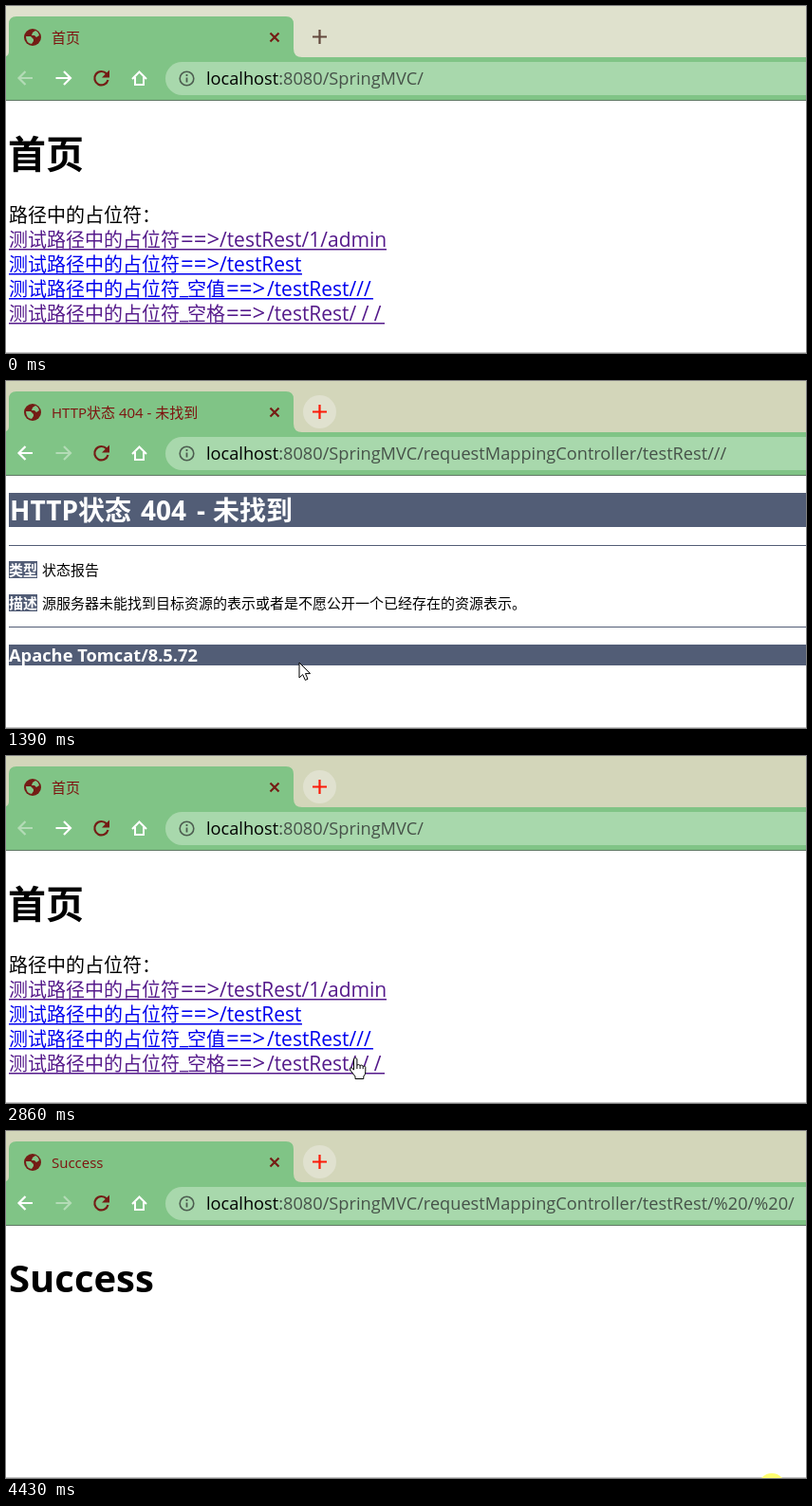
Write an HTML page that moves like this. It is 843 by 366 pixels and loops after 4500 ms.

```html
<!DOCTYPE html>
<html lang="zh-CN">
<head>
<meta charset="utf-8">
<title>首页</title>
<style>
  html, body { margin: 0; width: 100%; height: 100%; overflow: hidden; background: #fff; }
  svg { display: block; width: 843px; height: 366px; }
  text { font: 15px "Open Sans", "Noto Sans CJK SC", "Noto Sans CJK", sans-serif; white-space: pre; }
  .red { fill: #7d120f; }
  .line { fill: none; stroke-width: 2.2; }
  .url { font-size: 18.2px; fill: #465249; }
  .bold { font-weight: 700; }
  .white { fill: #fff; }
  .slate { fill: #525d76; }
</style>
</head>
<body>
<svg viewBox="0 0 843 366">
  <defs>
    <linearGradient id="fade">
      <stop stop-color="#80c486" stop-opacity="0"/>
      <stop offset="1" stop-color="#80c486"/>
    </linearGradient>
  </defs>

  <rect id="strip" width="843" height="54"/>
  <path fill="#80c486" d="M0 53q3-1 3-5V19q0-8 8-8H295q8 0 8 8V45q0 9 9 9H843V99H0Z"/>
  <rect y="99" width="843" height="1" fill="#5f7864"/>
  <rect x="168" y="59" width="700" height="35" rx="17.5" fill="#a8d8ac"/>

  <g id="globe">
    <circle cx="28" cy="33" r="9" fill="#741c15"/>
    <path fill="#80c486" d="M21 32h5l3 3v2l-2 3q-6-1-6-8ZM28 28l3-2q3 1 4 5l-3 2l-2-2h-3Z"/>
  </g>
  <path id="spinner" class="line" stroke="#4673a8"/>
  <text id="title" class="red" x="48" y="38.500"></text>
  <rect id="veil" x="238" y="20" width="32" height="28" fill="url(#fade)"/>
  <path class="line" stroke="#741c15" d="M278.500 28.500l9 9m0-9l-9 9"/>
  <circle id="plusDisc" cx="330.500" cy="32.500" r="17.500" fill="#e0e1cf"/>
  <path id="plus" class="line" d="M323 32.500h15M330.500 25v15"/>

  <circle id="hover" cx="20.500" cy="76" r="17.500" fill="#69a771"/>
  <path id="back" class="line" stroke="#fff" d="M28 76H13.500M20.500 69l-7 7l7 7"/>
  <path id="forward" class="line" stroke="#fff" d="M52.500 76H68M61 69l7 7l-7 7"/>
  <g id="reload">
    <path class="line" stroke="#741c15" d="M106 71.500A7.200 7.200 0 1 0 107.500 78"/>
    <path fill="#741c15" d="M109 67.500v8h-8Z"/>
  </g>
  <path id="stop" class="line" stroke="#741c15" d="M93.500 69l14 14m0-14l-14 14"/>
  <path class="line" stroke="#fff" style="stroke-width:2" d="M133 77l7.500-7.500l7.500 7.500M136 75v8h9v-8"/>
  <circle class="line" cx="190.500" cy="76.500" r="7.300" stroke="#4d5d50" style="stroke-width:1.600"/>
  <path class="line" stroke="#4d5d50" style="stroke-width:1.800" d="M190.500 75.500v5M190.500 72v2"/>
  <text class="url" x="211" y="83"><tspan fill="#000">localhost</tspan>:8080/SpringMVC/<tspan id="path"></tspan></text>

  <g id="home">
    <text x="2" y="171" class="bold" style="font-size:40px">首页</text>
    <text x="3" y="228" style="font-size:20px">路径中的占位符：</text>
  </g>

  <g id="error">
    <path class="slate" d="M3 118H843V154H3ZM3 173H843V174H3ZM3 259H843V260H3ZM3 278H843V300H3ZM3 190h30v18h-30ZM3 225h30v18h-30Z"/>
    <g class="white">
      <text class="bold" y="147" style="font-size:28px"><tspan x="4">HTTP</tspan><tspan x="76">状态</tspan><tspan x="142">404</tspan><tspan x="201">-</tspan><tspan x="218">未找到</tspan></text>
      <text class="bold" x="3" y="205">类型</text>
      <text class="bold" x="3" y="240">描述</text>
      <text class="bold" x="3" y="295.500" style="font-size:18.300px">Apache Tomcat/8.5.72</text>
    </g>
    <text x="38" y="205">状态报告</text>
    <text x="38" y="240">源服务器未能找到目标资源的表示或者是不愿公开一个已经存在的资源表示。</text>
  </g>

  <text id="success" x="3" y="170" class="bold" style="font-size:40px">Success</text>

  <g id="status">
    <path fill="#d3d6ba" d="M0 348H454q4 0 4 4V366H0Z"/>
    <text class="red" x="-1" y="368.500" style="font-size:15.500px">localhost:8080/SpringMVC/requestMappingController/...//</text>
  </g>
  <rect y="365" width="843" height="1" fill="#c6c6c6"/>
  <circle id="glow" cx="807" cy="375.500" r="14.500" fill="#ffff70"/>

  <g id="cursor" fill="#fff" stroke="#000" stroke-linejoin="round">
    <path id="arrow" d="M0 0V16L3.700 12.600L6.300 18.500L9 17.300L6.500 11.600H11.500Z"/>
    <g id="hand">
      <path d="M-1.500 1.500q1.700-2.500 3.400 0V8q1.700-1.200 3.200.4q1.700-1 3.100.8q2-.8 2.600 1.200V15q0 3-2 5v2.500H0V20L-5.500 13q-.8-2.500 1.500-2.300L-1.500 13Z"/>
      <path fill="none" d="M1.900 8v4M5.100 8.400v3.600M8.200 9.200v3"/>
    </g>
  </g>
</svg>
<script>
const $ = id => document.getElementById(id);
const show = (id, on) => $(id).style.display = on ? '' : 'none';

function link(y, color, tag, tail, right) {
  const x = tag ? 232 : 184;
  const run = (at, top, size, s) =>
    `<tspan x="${at}" y="${top}" style="font-size:${size}px">${s}</tspan>`;
  $('home').insertAdjacentHTML('beforeend', `<g fill="${color}">
    <text x="3" y="${y}" style="font-size:20px">测试路径中的占位符${
      tag ? run(183, y - 2, 20, '_') + run(191, y, 20, tag) : ''
    }${run(x, y, 24, '==&gt;')}${run(x + (tag ? 43 : 41), y, 21, tail)}</text>
    <rect x="3" y="${y + 2}" width="${right - 3}" height="1.500"/></g>`);
}
const visited = '#551a8b', fresh = '#0000ee';
link(254, visited, '', '/testRest/1/admin', 401);
link(280, fresh, '', '/testRest', 312);
link(306, fresh, '空值', '/testRest///', 387);
link(332, visited, '空格', '/testRest/ / /', 399);

// Pointer stops: time, x, y
const stops = [
  [70, 520, 360], [560, 309, 297], [1400, 309, 297], [1870, 22, 68], [2330, 22, 68],
  [2640, 415, 333], [2860, 368, 318], [3100, 368, 318], [3390, 613, 307],
  [3530, 640, 316], [4010, 791, 362], [4080, 794, 360], [4160, 793, 362], [4300, 807, 376]
];

function pointer(t) {
  const i = stops.findIndex(s => s[0] > t);
  if (i < 1) return i ? stops.at(-1).slice(1) : stops[0].slice(1);
  const [a, b] = [stops[i - 1], stops[i]];
  const u = (t - a[0]) / (b[0] - a[0]), k = u * u * (3 - 2 * u);
  return [a[1] + (b[1] - a[1]) * k, a[2] + (b[2] - a[2]) * k];
}

function spin(dt) {
  const from = (dt * 0.69 - 200) * Math.PI / 180;
  const sweep = Math.min(0.65, dt / 400) * 2 * Math.PI;
  const at = a => `${28 + 8.5 * Math.cos(a)} ${33 + 8.5 * Math.sin(a)}`;
  $('spinner').setAttribute('d',
    `M${at(from)}A8.500 8.500 0 ${+(sweep > Math.PI)} 1 ${at(from + sweep)}`);
  $('spinner').style.opacity = Math.min(1, dt / 220);
}

const ERROR = 900, HOME = 2220, SUCCESS = 3130;

function draw(t) {
  const page = t >= SUCCESS ? 'success' : t >= ERROR && t < HOME ? 'error' : 'home';
  for (const p of ['home', 'error', 'success']) show(p, p === page);
  const home = page === 'home', error = page === 'error';
  const dt = t - (error ? ERROR : SUCCESS);
  const loading = !home && dt < (error ? 360 : 430);
  const active = t >= ERROR;

  $('strip').setAttribute('fill', active ? '#d3d6ba' : '#dfe1cd');
  $('plus').setAttribute('stroke', active ? '#fb1a08' : '#63483c');
  show('plusDisc', active);

  $('title').textContent = home ? '首页' : !error ? 'Success'
    : loading ? 'localhost:8080/SpringMVC/req' : 'HTTP状态 404 - 未找到';
  $('path').textContent = home ? ''
    : 'requestMappingController/testRest/' + (error ? '//' : '%20/%20/');
  show('veil', error && loading);
  show('globe', !loading);
  show('spinner', loading);
  show('reload', !loading);
  show('stop', loading);
  if (loading) spin(dt);

  show('status', !home && dt < 430);
  $('back').style.opacity = home ? 0.4 : 1;
  $('forward').style.opacity = home ? 1 : 0.4;
  show('hover', t >= 1840 && t < HOME);

  const [x, y] = pointer(t);
  const over = home && x < 399 && y > 236 && y < 335;
  show('cursor', t >= 70);
  show('hand', over);
  show('arrow', !over);
  $('cursor').setAttribute('transform', `translate(${x} ${y})`);
  show('glow', t >= 4430);
}

const start = performance.now();
function tick() {
  draw((performance.now() - start) % 4500);
  requestAnimationFrame(tick);
}
tick();
</script>
</body>
</html>
```
